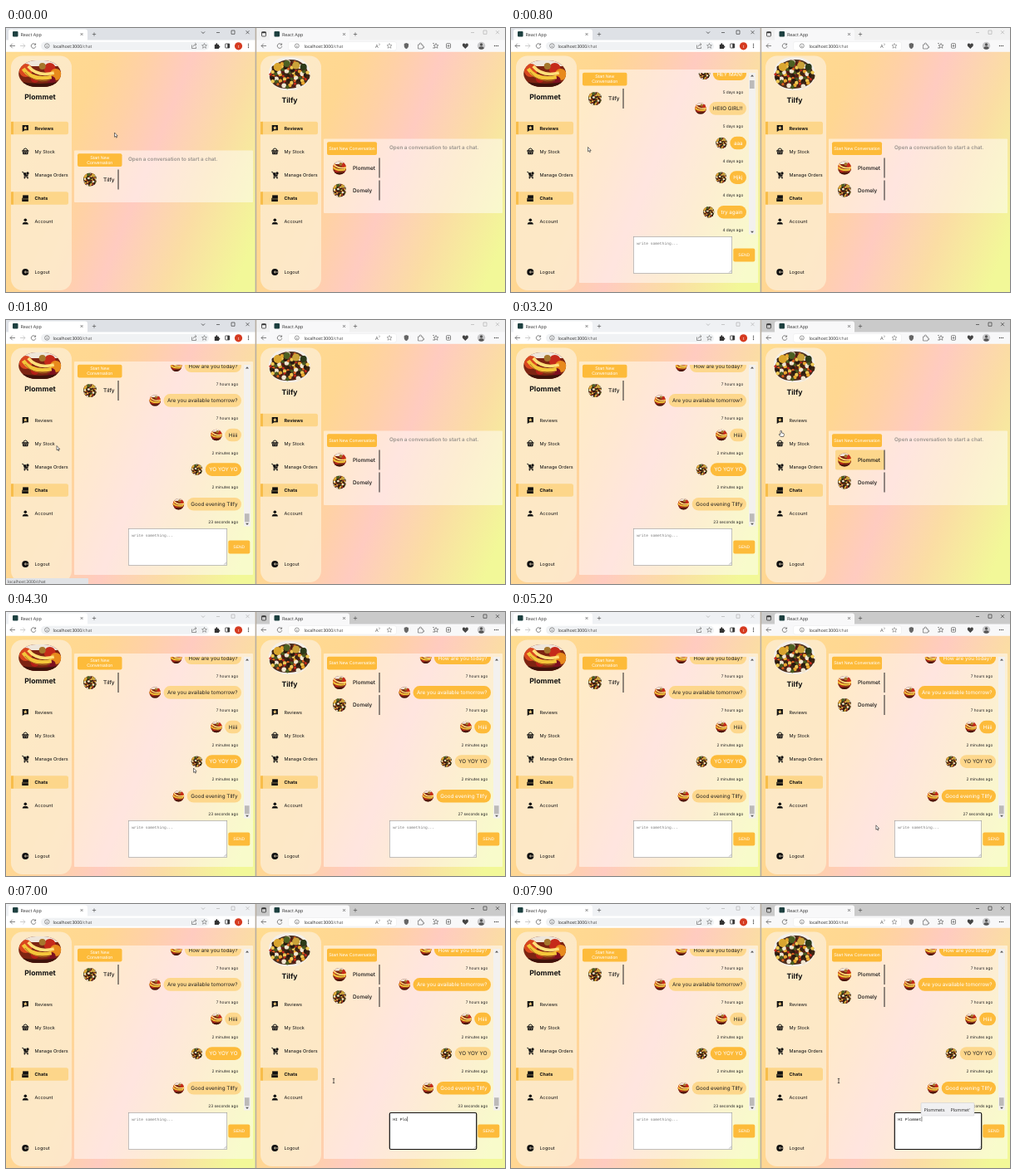
These frames come from a looping animation (600 by 318 pixels, 8 s). An HTML page:

```html
<!DOCTYPE html>
<html lang="en">
<head>
<meta charset="utf-8">
<title>Chat in two windows</title>
<style>
html, body { margin: 0; width: 600px; height: 318px; overflow: hidden; background: #fff; }
svg { display: block; text-rendering: geometricPrecision; font-family: Inter, sans-serif; }
.ui { font-family: "Open Sans", sans-serif; }
.btn { font-family: "Liberation Sans", Arial, sans-serif; }
.mono { font-family: "Liberation Mono", monospace; }
</style>
</head>
<body>
<svg id="stage" width="600" height="318" viewBox="0 0 600 318"></svg>
<script>
const LOOP = 8000, STEP = 100;
const SHOP = 'Plommet', PAL = 'Tilfy', THIRD = 'Domely';
const AMBER = '#fdbb3a', PALE = '#fdd78c';
const stage = document.getElementById('stage');
const pen = document.createElement('canvas').getContext('2d');

// ---- helpers
const clamp = v => Math.max(0, Math.min(1, v));
const ease = p => p < .5 ? 4 * p ** 3 : 1 - (2 - 2 * p) ** 3 / 2;
const rect = (x, y, w, h, fill, r = 0, more = '') =>
  `<rect x="${x}" y="${y}" width="${w}" height="${h}" rx="${r}" fill="${fill}" ${more}/>`;
const disc = (x, y, r, fill) => `<circle cx="${x}" cy="${y}" r="${r}" fill="${fill}"/>`;
const line = (d, color = '#555', w = .7) =>
  `<path d="${d}" fill="none" stroke="${color}" stroke-width="${w}"/>`;
const shape = (d, fill = '#111') => `<path d="${d}" fill="${fill}"/>`;
const text = (x, y, size, s, fill = '#111', more = '') =>
  `<text x="${x}" y="${y}" font-size="${size}" fill="${fill}" xml:space="preserve" ${more}>${s}</text>`;
const at = (x, y, body, k = 1) => `<g transform="translate(${x} ${y}) scale(${k})">${body}</g>`;
const MID = 'text-anchor="middle"', END = 'text-anchor="end"', UI = 'class="ui"';
const textWidth = (s, size) => {
  pen.font = `${size * 10}px Inter, sans-serif`;
  return pen.measureText(s).width / 10;
};

// ---- fruit pictures, drawn around 0,0 in a 50 x 40 area
const fruit = list => list.map(([x, y, r, c]) => disc(x, y, r, c)).join('');
const HUES = ['#c4271c', '#3b2413', '#e9a62f', '#5a1713', '#f2e6cf', '#47591f', '#d9601f', '#2a1a10', '#f0c955'];
const berries = Array.from({ length: 80 }, (_, i) => {
  const far = Math.sqrt(i / 80), angle = i * 2.4;
  return [24 * far * Math.cos(angle), 1 + 16 * far * Math.sin(angle), 1.6 + i * 5 % 3 * .6, HUES[i * 7 % HUES.length]];
});
const pictures = `
<clipPath id="oval"><rect x="-25.5" y="-16" width="51" height="32" rx="21" ry="16"/></clipPath>
<clipPath id="egg"><rect x="-25" y="-20" width="50" height="40" rx="22" ry="20"/></clipPath>
<clipPath id="round"><circle r="16"/></clipPath>
<g id="basket">${rect(-26, -20, 52, 40, '#7d2412')}${rect(-26, -20, 52, 11, '#efe6da')}
${fruit([[-17, -4, 8, '#d9471f'], [12, -6, 7, '#c52a1a'], [19, 1, 7, '#e88a1c'], [3, -9, 4, '#a5762c'], [-6, 6, 5, '#b51d18'], [14, 8, 5, '#7c1020']])}
${line('M-20 -6Q-10 9 14 4', '#f3c63a', 4.5)}${line('M-14 -9Q-3 4 17 -1', '#ffe07a', 3.5)}${line('M-18 -2Q-8 12 12 8', '#a86a1c', 1)}
${line('M-26 12Q0 17 26 12', '#3f130b', 5)}</g>
<g id="pile">${rect(-26, -21, 52, 42, '#f4efe8')}${shape('M-24 4Q-20-16 0-17T24 4Q20 17 0 18T-24 4Z', '#4a2c1c')}
${fruit(berries)}${fruit([[-14, -8, 5, '#d9a52f'], [8, -10, 4.5, '#caa23a'], [17, -8, 4, '#2c3a1a'], [-3, -12, 4, '#4c5f22']])}</g>`;
const picture = (id, clip, x, y, k = 1) =>
  at(x, y, `<g clip-path="url(#${clip})"><use href="#${id}"/></g>`, k);

// ---- side menu
const ICONS = {
  Reviews: shape('M-4-4H4V3H-1L-4 5Z') + shape('M0-3L.8-1.2 2.6-.9 1.2.3 1.6 2.1 0 1.2-1.6 2.1-1.2.3-2.6-.9-.8-1.2Z', '#fdd27f'),
  'My Stock': line('M-2.5-.5V-2.5Q0-5.5 2.5-2.5V-.5', '#111', 1.1) + shape('M-4.5-1.5H4.5V.3H-4.5ZM-4 .8H4L3.2 4.3H-3.2Z') + disc(-1.4, 2.5, .6, '#fdeaca') + disc(1.4, 2.5, .6, '#fdeaca'),
  'Manage Orders': line('M-4.5-4H-3L-1 1.3H3.5M-1 1.3L-1.7 2.5H3.5', '#111', 1) + shape('M-2.5-3H1V-.5H4L3.3 1H-1Z') + disc(-1, 4, 1, '#111') + disc(3, 4, 1, '#111') + disc(3, -2.3, 1.8, '#111'),
  Chats: shape('M-3.5-4H4V1H-3.5Z') + shape('M-4.5-.2H1.5L4 1.5V4.5H-4.5Z') + line('M-4 1H3.8', '#fdd27f', .5),
  Account: disc(0, -2, 2, '#111') + shape('M-4 4Q-4 .7 0 .7T4 4Z'),
  Logout: disc(0, 0, 4.5, '#111') + line('M-1 0H4.5M.8-1.6L-1 0 .8 1.6', '#fdeaca', .8),
};
const MENU_Y = [120.5, 148.5, 177, 205, 233, 294];

function menu(win, t) {
  const rows = Object.keys(ICONS).map((name, i) => {
    const y = MENU_Y[i];
    const on = name === 'Chats' || name === 'Reviews' && t < win.reviewsOff;
    return (on ? rect(6, y - 7.7, 69, 15.4, '#fdd68a', 2.5) + rect(6, y - 7.7, 3, 15.4, '#f8bd4a') : '') +
      at(23.3, y, ICONS[name], .9) + text(34.5, y + 2, 5.5, name, '#111', `font-weight="${on ? 700 : 400}"`);
  }).join('');
  return rect(6, 33.5, 73, 282.5, '#fdeccf', 14, 'opacity=".86"') +
    picture(win.pic, win.clip, 40.7, 55) +
    text(41, win.titleY, 8.7, win.owner, '#111', `${MID} font-weight="700"`) + rows;
}

// ---- messages: [sent by shop, text, age]
const FIRST = [[1, 'hello', '5 days ago'], [0, 'HEY MAN!', '5 days ago'], [1, 'HEllO GIRL!!', '5 days ago'],
  [0, 'aaa', '4 days ago'], [0, 'Hjkj', '4 days ago'], [0, 'try again', '4 days ago']];
const LAST = [[1, 'How are you today?', '7 hours ago'], [1, 'Are you available tomorrow?', '7 hours ago'],
  [1, 'Hiiii', '2 minutes ago'], [0, 'YO YOY YO', '2 minutes ago'], [1, 'Good evening TIlfy', '']];
const FILL = ['hey', 'try again', 'ok', 'Hello there', 'test', 'how are you'];
const COUNT = 80, PITCH = 41.6, END_ROW = COUNT - LAST.length;
const message = i => i < FIRST.length ? FIRST[i]
  : i >= END_ROW ? LAST[i - END_ROW]
  : [i * 7 % 5 < 2 ? 1 : 0, FILL[i * 5 % FILL.length], i < 50 ? '3 days ago' : 'a day ago'];

function messages(win, t) {
  const run = t - win.open;
  const row = clamp(run / 300) + (END_ROW - 1) * ease(clamp((run - 300) / 500));
  let out = '';
  for (let i = Math.max(0, Math.floor(row) - 1); i < Math.min(COUNT, row + 6); i++) {
    const [shop, words, age] = message(i);
    const y = 55.3 + (i - row) * PITCH;
    const own = !!shop === win.isShop;
    const w = textWidth(words, 6.3) + 9;
    out += rect(283 - w, y - 7.8, w, 15.6, own ? PALE : AMBER, 7.8) +
      text(283 - w / 2, y + 2.2, 6.3, words, own ? '#222' : '#fff', MID) +
      picture(shop ? 'basket' : 'pile', 'round', 283 - w - 10.3, y, .42) +
      text(279.3, y + 23.2, 4.75, age || `${win.seconds(t)} seconds ago`, '#222', END);
  }
  const thumb = 60.7 + 172.5 * row / END_ROW;
  return `<g clip-path="url(#scroll)">${out}</g>` +
    rect(286, 54, 8, 194.5, '#f3f1ef') + rect(287, thumb, 5.6, 10, '#bcbab9') +
    shape('M288 58.5L290 56.2 292 58.5Z', '#555') + shape('M288 244.8L290 247 292 244.8Z', '#555');
}

function composer(win, t) {
  const x = win.boxX + .3, w = 265.7 - x;
  const focus = t >= win.focus;
  const typed = focus ? `HI ${SHOP}`.slice(0, Math.max(0, Math.floor((t - 5900) / 190) + 1)) : '';
  const caret = x + 4 + typed.length * 2.82;
  return rect(x, 251.5, w, 44, '#fff', focus ? 1.5 : 0, `stroke="${focus ? '#111' : '#999'}" stroke-width="${focus ? 1.2 : .6}"`) +
    (typed ? text(x + 4, 260.5, 4.7, typed, '#111', 'class="mono"')
           : text(x + 4, 260.5, 4.6, 'write something...', '#777', 'class="mono"')) +
    (focus ? line(`M${caret + .4} 256V262`, '#111', .5) : '') +
    line('M262.2 294.5L265 291.7M263.9 294.5L265 293.4', '#777', .5) +
    rect(267.3, 265.5, 26, 16, AMBER, 2) + text(280.3, 275.3, 5, 'SEND', '#fff', `${MID} class="btn"`) +
    (focus && t >= 7500 ? rect(193, 239.5, 64, 15.5, '#f0f0f2', 1, 'stroke="#c8c8cc" stroke-width=".5"') +
      text(196.5, 249.7, 5.3, `${SHOP}s`, '#222', UI) + text(228.5, 249.7, 5.3, `${SHOP}'`, '#222', UI) : '');
}

function contact(name, pic, y, hot) {
  return (hot ? rect(90, y - 12, 59, 24, PALE, 2) : '') + picture(pic, 'round', 101, y, .5) +
    text(117, y + 2.3, 6.4, name, '#111', 'font-weight="500"');
}

function chat(win, t) {
  const open = t >= win.open;
  const [top, bottom] = open ? [50, 307] : win.closed;
  const y = top + (open ? 3.7 : 3.8);
  const label = win.isShop ? ['Start New', 'Conversation'] : ['Start New Conversation'];
  const list = win.contacts.map(([name, pic], i) => {
    const cy = top + 35 + i * 27;
    return contact(name, pic, cy, i === 0 && !open && t >= win.hover) +
      line(`M${win.barX} ${cy - 12}V${cy + 12}`, '#222', 1);
  }).join('');
  return rect(82, top, 215, bottom - top, '#fff', 1, 'opacity=".5"') +
    rect(86, y, win.btnW, 15.7, AMBER, 2) +
    label.map((s, i) => text(86 + win.btnW / 2, y + (label[1] ? 6.5 + i * 6 : 9.7), 5.25, s, '#fff', `${MID} class="btn"`)).join('') +
    list + (open ? messages(win, t) + composer(win, t)
      : text(win.boxX, top + 12.3, 6.25, 'Open a conversation to start a chat.', '#99938d', 'font-weight="600"'));
}

// ---- browser frames
const STAR = 'M0-3L.9-.9 3-.8 1.3.6 2 2.8 0 1.5-2 2.8-1.3.6-3-.8-.9-.9Z';
const reload = (x, y) => line(`M${x + 2.3} ${y - 1.6}A2.8 2.8 0 1 0 ${x + 2.8} ${y + .6}M${x + 2.6} ${y - 3}V${y - 1.2}H${x + .8}`);
const back = (x, y) => line(`M${x + 3} ${y}H${x - 3}M${x - .3} ${y - 2.7}L${x - 3} ${y}L${x - .3} ${y + 2.7}`);
const dots = (x, dx, dy) => [-1, 0, 1].map(i => disc(x + i * dx, 21.5 + i * dy, .7, '#444')).join('');
const address = x => text(x, 23.7, 5.15, 'localhost:3000<tspan fill="#555">/chat</tspan>', '#222', UI);
const tab = (x, close, plus) => rect(x, 4, 6.5, 6.5, '#1d4040', 1) +
  text(x + 9.5, 9.7, 5.4, 'React App', '#333', UI) +
  line(`M${close - 1.5} 6L${close + 1.5} 9M${close + 1.5} 6L${close - 1.5} 9M${plus - 2.2} 7.5H${plus + 2.2}M${plus} 5.3V9.7`, '#444', .6);
const controls = (a, b, c, color) =>
  line(`M${a - 2} 5.5H${a + 2}M${b - 2} 3H${b + 2}V7.3H${b - 2}ZM${c - 2} 3.2L${c + 2} 7.2M${c + 2} 3.2L${c - 2} 7.2`, color, .6);

function leftFrame(active) {
  const ink = active ? '#222' : '#aaa';
  return rect(0, 0, 300, 28.5, '#fff') + rect(0, 0, 300, 14.5, active ? '#dee1e6' : '#eff1f4') +
    rect(3, 1.5, 95, 15, '#fff', 3) + tab(8, 91, 106) +
    line('M235 4.5L237 6.5 239 4.5', ink) + controls(255, 273, 290.5, ink) +
    back(8, 21.5) + line('M17 21.5H23M20.3 18.8L23 21.5 20.3 24.2', '#bbb') + reload(33, 21.5) +
    rect(42, 16.8, 202, 10, '#f0f2f4', 5) + line('M52 21.5A2.7 2.7 0 1 1 46.6 21.5A2.7 2.7 0 1 1 52 21.5M49.3 21V23M49.3 19.7V20.2', '#555', .6) +
    address(56.5) + line('M223.5 20.5V24.5H228.5V22.5M225 22.5Q225.5 19.7 228.8 19.7M227.3 18L229 19.7 227.3 21.3', '#555', .6) +
    at(238.5, 21.5, line(STAR, '#555', .5)) +
    shape('M250.8 20H252.3Q252 18.3 253.3 18.3T254.3 20H256V21.6Q257.4 21.6 257.4 22.7T256 23.8V25H250.8Z', '#333') +
    rect(263.7, 19, 5, 5, 'none', .4, 'stroke="#333" stroke-width=".8"') + rect(266.3, 19, 2.4, 5, '#333') +
    disc(279.5, 21.8, 4.6, '#d53a20') +
    text(279.5, 23.5, 4.8, 't', '#fff', `${MID} class="ui"`) + dots(291.5, 0, 2);
}

function rightFrame(active) {
  const ink = active ? '#222' : '#aaa';
  return rect(0, 0, 300, 28.5, '#f8f8f9') + rect(0, 0, 300, 14.5, active ? '#cacaca' : '#f1f1f1') +
    rect(17, 1.5, 96, 15, '#f8f8f9', 3) + rect(7.5, 4.5, 5, 5.5, 'none', .8, 'stroke="#333" stroke-width=".8"') +
    line('M7.5 5.6H12.5', '#333', 1.2) + tab(22.5, 106.5, 120) +
    controls(261, 276, 291, ink) + back(10, 21.5) + reload(29, 21.5) +
    rect(39.5, 16.5, 130, 10.5, '#fff', 2.5, 'stroke="#e2e2e4" stroke-width=".4"') +
    line('M52.3 21.5A2.5 2.5 0 1 1 47.3 21.5A2.5 2.5 0 1 1 52.3 21.5M49.8 21V23', '#555', .6) + address(58.5) +
    text(144, 23.7, 5.8, 'A', '#555', UI) + line('M148.6 18.5Q150 19.7 148.6 21', '#555', .5) +
    at(161, 21.5, line(STAR, '#666', .5)) + shape('M178.7 19L181.3 18 184 19V22Q183.5 24.3 181.3 25.2Q179 24.3 178.7 22Z', '#666') +
    line('M195.5 20H197.3Q196.7 18 198.3 18T199.3 20H201V22Q202.8 21.6 202.8 23T201 23.8V25H195.5Z', '#555', .6) +
    at(217, 21.5, line(STAR, '#555', .6)) + line('M213 18.5H215M213 24H215', '#555', .6) +
    rect(229.5, 18.7, 5, 5.5, 'none', .8, 'stroke="#555" stroke-width=".7"') + line('M232 20V23M230.6 21.5H233.4', '#555', .6) +
    shape('M252.3 25L249 21.7Q248.3 18.5 250.6 18.6 251.7 18.6 252.3 19.8 253 18.6 254.1 18.6 256.4 18.5 255.6 21.7Z', '#444') +
    disc(271.5, 21.5, 4.7, '#c9c9cb') + disc(271.5, 20, 1.7, '#555') + shape('M268.3 24.7Q268.5 22.3 271.5 22.3T274.7 24.7Q271.5 27 268.3 24.7Z', '#555') +
    dots(289.5, 2, 0);
}

const LEFT = {
  isShop: true, owner: SHOP, pic: 'basket', clip: 'oval', titleY: 86, reviewsOff: 1200,
  hover: 300, open: 500, focus: Infinity, closed: [147.5, 210], btnW: 53.5, boxX: 147, barX: 135,
  contacts: [[PAL, 'pile']], seconds: () => 23,
};
const RIGHT = {
  isShop: false, owner: PAL, pic: 'pile', clip: 'egg', titleY: 90, reviewsOff: 3100,
  hover: 2700, open: 3300, focus: 5600, closed: [133.5, 223], btnW: 60, boxX: 161, barX: 149,
  contacts: [[SHOP, 'basket'], [THIRD, 'pile']],
  seconds: t => t < 5900 ? 27 : 31 + Math.floor((t - 5900) / 480),
};

// ---- pointer: [time, x, y]
const PATH = [[0, 130.5, 126], [300, 119, 180], [450, 119, 180], [800, 92.5, 143.5], [1200, 58, 122],
  [1800, 61, 151.5], [2300, 200, 160], [2700, 425, 168], [2900, 425, 168], [3200, 324, 133.5],
  [3600, 340, 170], [4300, 225.5, 188], [4800, 250, 225], [5400, 505, 268], [5700, 505, 268], [6000, 394, 213]];

function pointer(t) {
  let i = PATH.findIndex(p => p[0] > t);
  if (i < 0) i = PATH.length;
  const a = PATH[i - 1], b = PATH[i] || a;
  const p = b === a ? 0 : (t - a[0]) / (b[0] - a[0]);
  const k = p * p * (3 - 2 * p);
  const hand = t >= 250 && t < 600 || t >= 2650 && t < 3300;
  const edge = 'stroke="#222" stroke-width=".6" stroke-linejoin="round" fill="#fff"';
  const body = t >= 5300 ? line('M-1.2-2.6H1.2M0-2.6V2.6M-1.2 2.6H1.2', '#222', .7)
    : hand ? `<path d="M0 0Q1-.8 1.5.3V2.5L4 3.2Q4.7 3.6 4.3 5L3.7 7H.3L-2 4.4Q-1.5 3.5 0 4.5Z" ${edge}/>`
    : `<path d="M0 0V5.3L1.2 4.3 2.1 6.2 2.9 5.8 2.1 4H3.7Z" ${edge}/>`;
  return at(a[1] + (b[1] - a[1]) * k, a[2] + (b[2] - a[2]) * k, body);
}

function scene(t) {
  const rightActive = t >= 2800;
  const page = (win, frame) => rect(0, 28.5, 300, 289.5, 'url(#sky)') + menu(win, t) + chat(win, t) + frame;
  return `<defs>${pictures}
<clipPath id="scroll"><rect x="83" y="54" width="203" height="194.5"/></clipPath>
<linearGradient id="sky" gradientUnits="userSpaceOnUse" x1="0" y1="30" x2="335" y2="165">
<stop stop-color="#ffdc90"/><stop offset=".3" stop-color="#ffd792"/><stop offset=".44" stop-color="#ffd1a6"/>
<stop offset=".58" stop-color="#ffcbc0"/><stop offset=".78" stop-color="#fbdda4"/><stop offset="1" stop-color="#f2f898"/></linearGradient></defs>` +
    page(LEFT, leftFrame(!rightActive)) +
    (t >= 1300 && t < 2300 ? rect(0, 311, 99, 7, '#e1e3e6', 1) + text(2, 316.8, 5, 'localhost:3000/chat', '#444', UI) : '') +
    at(300, 0, page(RIGHT, rightFrame(rightActive))) +
    rect(299.6, 0, 1.6, 318, '#b8aea2') + pointer(t);
}

let shown = -1;
function tick(now) {
  const t = Math.floor(now % LOOP / STEP) * STEP;
  if (t !== shown) stage.innerHTML = scene(shown = t);
  requestAnimationFrame(tick);
}
tick(performance.now());
</script>
</body>
</html>
```
